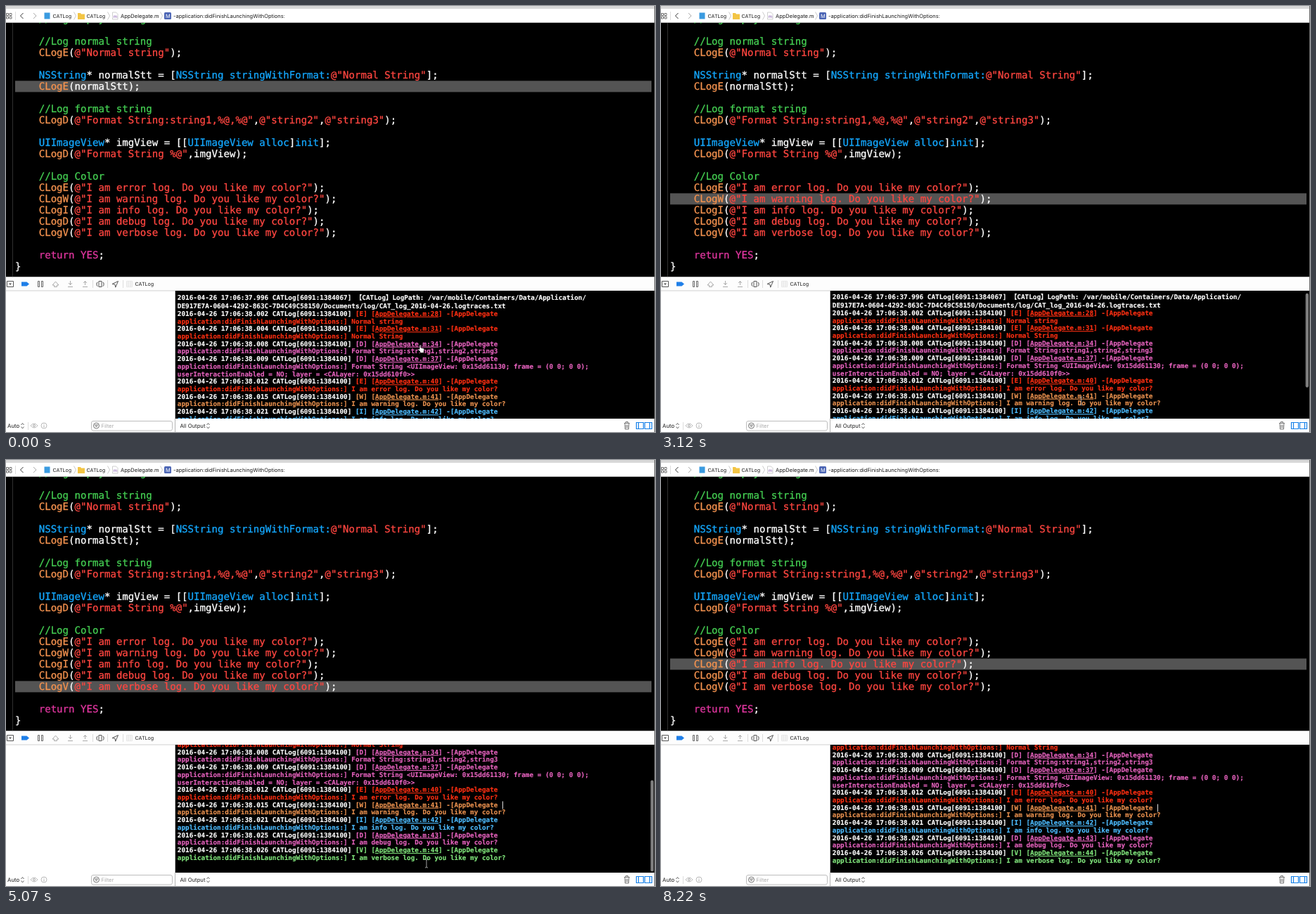
Write an HTML page that moves like this. It is 923 by 606 pixels and loops after 8670 ms.

```html
<!DOCTYPE html>
<html lang="en">
<head>
<meta charset="utf-8">
<title>Colored console log</title>
<style>
  html, body { margin: 0; width: 100%; height: 100%; overflow: hidden; background: #fff; }
  svg { display: block; width: 923px; height: 606px; }
  text { white-space: pre; text-rendering: geometricPrecision; }
  .mono { font-family: "DejaVu Sans Mono", "Noto Sans CJK SC", "Noto Sans CJK", monospace; fill: #fff; stroke: #fff; }
  #code { font-size: 14.08px; stroke-width: .3px; }
  #log { font-size: 9.35px; font-weight: bold; stroke-width: .15px; }
  .ui { font: 7.5px Inter, "Liberation Sans", sans-serif; fill: #1c1c1c; }
  .line { fill: none; stroke: #555; stroke-width: 1; }
  .dim { stroke: #aaa; }
</style>
</head>
<body>
<svg viewBox="0 0 923 606">
  <defs>
    <clipPath id="pane"><rect x="241" y="405" width="682" height="182"/></clipPath>
  </defs>
  <rect width="923" height="606" fill="#fff"/>

  <!-- editor -->
  <rect y="23.500" width="923" height="362"/>
  <path d="M9.5 24V385.500" stroke="#303030"/>
  <rect id="mark" x="13" width="905" height="16" fill="#545454"/>
  <g id="code" class="mono"></g>

  <!-- jump bar -->
  <rect width="923" height="23.500" fill="#fff"/>
  <rect width="923" height="4" fill="#d8d8d8"/>
  <g class="line">
    <path d="M.5 10.5h3v3h-3zM5 10.5h3v3h-3zM.5 15h3v3h-3zM5 15h3v3h-3z" stroke-width=".8"/>
    <path d="M24.500 10l-4 4 4 4" stroke="#333"/>
    <path d="M39 10l4 4-4 4" class="dim"/>
    <path d="M13.500 8v12" stroke="#ddd"/>
    <path d="M96.500 8.500l3 5.500-3 5.500M144.500 8.500l3 5.500-3 5.500M219.500 8.500l3 5.500-3 5.500" stroke="#bbb" stroke-width=".8"/>
  </g>
  <rect x="54.500" y="9.500" width="8" height="9" fill="#3a9be0"/>
  <path d="M102 10h4l1 1.500h5v7.500h-10z" fill="#f3c545"/>
  <path d="M151.500 9h5l2.500 2.500v7.500h-7.500z" fill="#fff" stroke="#bbb" stroke-width=".7"/>
  <rect x="225" y="9" width="10" height="10" rx="1.500" fill="#4a64b4"/>
  <g class="ui">
    <text x="66.500" y="16.700" font-size="7.150">CATLog</text>
    <text x="114.500" y="16.700" font-size="7.150">CATLog</text>
    <text x="152.800" y="17" font-size="6" fill="#7a4aa8">m</text>
    <text x="163" y="16.700">AppDelegate.m</text>
    <text x="227" y="16.700" fill="#fff">M</text>
    <text x="238" y="16.700">-application:didFinishLaunchingWithOptions:</text>
  </g>

  <!-- debug bar -->
  <rect y="385.500" width="923" height="19.500" fill="#fdfdfd"/>
  <path d="M0 405H241" stroke="#d0d0d0"/>
  <g class="line">
    <path d="M1.500 391.500h9v8h-9z"/>
    <path d="M4 394.500h4l-2 2.500z" fill="#555" stroke="none"/>
    <path d="M22 392.500h7.500l3.500 3-3.500 3h-7.500z" fill="#1f7fe8" stroke="none"/>
    <path d="M45.500 391.500h2v8h-2zM50.500 391.500h2v8h-2z" stroke-width=".9"/>
    <path class="dim" d="M66 397l4.500-5 4.500 5h-2.500v2.500h-4v-2.500z"/>
    <path class="dim" d="M91.500 391v5.500m-2.500-2.500l2.500 2.500 2.500-2.500M88 399.500h7"/>
    <path class="dim" d="M112.500 397v-5.500m-2.500 2.500l2.500-2.500 2.500 2.500M109 399.500h7"/>
    <path d="M132 391.500h4v8h-4zM130.500 393l-1.500 1v3.500l1.500 1M137.500 393l1.500 1v3.500l-1.500 1"/>
    <path d="M159.500 391.500l-8.500 4 4 .7.700 4z"/>
    <path d="M123.500 390v11M144.500 390v11M166.500 390v11" stroke="#ddd"/>
    <path d="M171.500 391.500h8v8h-8zM174 391.500v8M177 391.500v8M171.500 394h8M171.500 397h8" stroke="#ddd" stroke-width=".7"/>
  </g>
  <text class="ui" x="183.500" y="398.300" style="font-size:7.150px">CATLog</text>

  <!-- console -->
  <rect x="241" y="405" width="682" height="182"/>
  <path d="M240.500 405V606" stroke="#b5b5b5"/>
  <g clip-path="url(#pane)">
    <g id="scroll">
      <g id="log" class="mono"></g>
      <path id="caret" d="M706.500 550.500v11" stroke="#ddd"/>
    </g>
    <rect id="thumb" x="916.700" width="4.300" rx="2.150" fill="#7d7d7d"/>
  </g>

  <!-- bottom bar -->
  <rect x="241" y="587" width="682" height="19" fill="#fff"/>
  <g class="ui">
    <text x="2" y="600" style="font-size:7.800px">Auto</text>
    <text x="247.500" y="600" style="font-size:7.700px">All Output</text>
    <rect x="121.500" y="590.500" width="115" height="13.500" rx="2.500" fill="#fff" stroke="#bdbdbd"/>
    <text x="135.500" y="600" fill="#aaa">Filter</text>
  </g>
  <g class="line">
    <path d="M21.500 596l2-2.500 2 2.500M21.500 598.500l2 2.500 2-2.500M285.500 596l2-2.500 2 2.500M285.500 598.500l2 2.500 2-2.500" stroke-width=".9"/>
    <path d="M31.500 592v11" stroke="#ddd"/>
    <path class="dim" d="M35 597q5-6 10 0q-5 6-10 0z" stroke-width=".8"/>
    <circle class="dim" cx="40" cy="597" r="1.500"/>
    <circle class="dim" cx="54" cy="597" r="4" stroke-width=".8"/>
    <path class="dim" d="M54 594.500v1M54 596.500v3"/>
    <circle cx="128.500" cy="597" r="4" stroke-width=".8"/>
    <path d="M126 596h5M127 598h3" stroke-width=".9"/>
    <path d="M879 593.500h8M881.500 593v-1.500h3v1.500M880 594l.5 8h5l.5-8M882 595.500v5M884 595.500v5" stroke-width=".8"/>
    <path d="M896.500 592.500h10v9h-10zM908.500 592.500h10v9h-10z" stroke="#1580e8" stroke-width="1.200"/>
    <path d="M899.500 592.500v9M915.500 592.500v9" stroke="#1580e8" stroke-width="1.200"/>
  </g>

  <!-- window edge -->
  <path d="M922.500 0V606" stroke="#6a6a6a"/>

  <!-- pointer -->
  <g id="pointer">
    <path id="hand" d="M-2-5.500q1-1.200 2 0v3.500l4 1q1 .5.800 2l-.8 3v1.500h-5v-1.500l-3-3.500q-.5-1.500 1-1l1 .8z" fill="#fff" stroke="#000" stroke-width=".8"/>
    <path id="beam" d="M-2-6q2 0 2 1.500v9q0 1.500-2 1.500M2-6q-2 0-2 1.500M0 4.500q0 1.500 2 1.500" fill="none" stroke="#b4b4b4" stroke-width=".9"/>
  </g>
</svg>

<script>
const LOOP = 8670, TICK = 150;
const $ = id => document.getElementById(id);

function make(parent, name, attrs, text = "") {
  const node = document.createElementNS("http://www.w3.org/2000/svg", name);
  for (const key in attrs) node.setAttribute(key, attrs[key]);
  node.textContent = text;
  return parent.appendChild(node);
}
// A thin stroke in the text colour gives the heavier glyphs
const ink = color => ({ fill: color, stroke: color });

// Source code, coloured by token
const code = `//Log empty string

//Log normal string
CLogE(@"Normal string");

NSString* normalStt = [NSString stringWithFormat:@"Normal String"];
CLogE(normalStt);

//Log format string
CLogD(@"Format String:string1,%@,%@",@"string2",@"string3");

UIImageView* imgView = [[UIImageView alloc]init];
CLogD(@"Format String %@",imgView);

//Log Color
CLogE(@"I am error log. Do you like my color?");
CLogW(@"I am warning log. Do you like my color?");
CLogI(@"I am info log. Do you like my color?");
CLogD(@"I am debug log. Do you like my color?");
CLogV(@"I am verbose log. Do you like my color?");

return YES;
}`;
const syntax = [
  [/^\/\//, "#45d053"],
  [/^@"/, "#ff4640"],
  [/^CLog/, "#f3924f"],
  [/^(NSString|UIImageView|stringWithFormat:|alloc|init)$/, "#14a8ff"],
  [/^(return|YES)$/, "#e0369f"]
];
const token = /(\/\/.*|@"[^"]*"|CLog\w|\bNSString\b|UIImageView|stringWithFormat:|\balloc\b|\binit\b|return|YES)/;

code.split("\n").forEach((line, i) => {
  const row = make($("code"), "text", { x: line === "}" ? 13 : 46.7, y: 23.3 + 16 * i });
  for (const part of line.split(token)) {
    const rule = syntax.find(([pattern]) => pattern.test(part));
    make(row, "tspan", rule ? ink(rule[1]) : {}, part);
  }
});

// Console output
const levels = { E: "#ff2f12", W: "#e9914f", I: "#4dbcff", D: "#e562bd", V: "#80e57c" };
const entries = [
  ["002", "E", 28, "Normal string"],
  ["004", "E", 31, "Normal String"],
  ["008", "D", 34, "Format String:string1,string2,string3"],
  ["009", "D", 37, "Format String <UIImageView: 0x15dd61130; frame = (0 0; 0 0);\nuserInteractionEnabled = NO; layer = <CALayer: 0x15dd610f0>>"],
  ["012", "E", 40, "I am error log. Do you like my color?"],
  ["015", "W", 41, "I am warning log. Do you like my color?"],
  ["021", "I", 42, "I am info log. Do you like my color?"],
  ["025", "D", 43, "I am debug log. Do you like my color?"],
  ["026", "V", 44, "I am verbose log. Do you like my color?"]
];
let rowCount = 0;
function logRow(text, color = "#fff") {
  const y = rowCount ? 430.1 + 10.72 * (rowCount - 1) : 418.4;
  rowCount++;
  return make($("log"), "text", { x: 243.8, y, ...ink(color) }, text);
}

logRow("2016-04-26 17:06:37.996 CATLog[6091:1384067] 【CATLog】LogPath: /var/mobile/Containers/Data/Application/");
logRow("DE917E7A-0604-4292-863C-7D4C49C58150/Documents/log/CAT_log_2016-04-26.logtraces.txt");
for (const [ms, level, line, message] of entries) {
  const color = levels[level];
  const row = logRow(`2016-04-26 17:06:38.${ms} CATLog[6091:1384100] `);
  make(row, "tspan", ink(color), `[${level}] [`);
  make(row, "tspan", { ...ink(color), "text-decoration": "underline" }, `AppDelegate.m:${line}`);
  make(row, "tspan", ink(color), "] -[AppDelegate");
  `application:didFinishLaunchingWithOptions:] ${message}`.split("\n").forEach(s => logRow(s, color));
}

// Timelines: [time, value...]
const marked = [[0, 31], [300, 34], [1890, 40], [2820, 41], [4620, 44], [6570, 42]];
const caretOn = [[0, 0], [450, 1], [1050, 0], [1440, 1], [2040, 0], [2520, 1], [3120, 0], [3720, 1],
  [4320, 0], [4770, 1], [5370, 0], [5970, 1], [6570, 0], [7170, 1], [7620, 0], [8220, 1]];
const shape = [[0, "hand"], [300, "beam"], [1290, "hand"], [1890, "beam"], [2340, "hand"], [2820, "beam"],
  [3870, "hand"], [4620, "beam"], [5820, "hand"], [6570, "beam"], [7020, "none"]];
const path = [[0, 590, 488], [750, 590, 488], [1290, 590, 530], [1590, 590, 533], [1890, 590, 533],
  [2520, 597, 561], [3720, 598, 563], [4020, 600, 577], [4620, 600, 577], [5070, 598, 574],
  [5370, 598, 574], [5970, 599, 523], [6270, 599, 525], [7020, 599, 525]];
const offset = [[0, 0], [2970, 0], [3120, 1], [3270, 10], [3420, 29], [3570, 43], [3720, 49],
  [4920, 49], [5070, 65], [5220, 65], [5520, 62], [5820, 61]];

const hold = (keys, t) => keys.filter(k => k[0] <= t).pop()[1];
function tween(keys, t, n = 1) {
  const i = keys.findIndex(k => k[0] > t);
  if (i < 0) return keys[keys.length - 1][n];
  const a = keys[i - 1], b = keys[i];
  return a[n] + (b[n] - a[n]) * (t - a[0]) / (b[0] - a[0]);
}

function draw(t) {
  // Movement advances on a coarse tick
  const tick = Math.max(0, Math.floor((t + 30) / TICK) * TICK - 30);
  const show = (id, on) => $(id).setAttribute("visibility", on ? "visible" : "hidden");

  $("mark").setAttribute("y", 106.4 + 16 * (hold(marked, t) - 31));

  const y = tween(offset, tick);
  $("scroll").setAttribute("transform", `translate(0 ${-y})`);
  const top = 408 + 0.73 * y;
  $("thumb").setAttribute("y", top);
  $("thumb").setAttribute("height", Math.min(134, 585.5 - top));
  show("thumb", t >= 3120 && t < 7170);
  show("caret", hold(caretOn, t));

  const kind = hold(shape, t);
  $("pointer").setAttribute("transform", `translate(${tween(path, tick, 1)} ${tween(path, tick, 2)})`);
  show("hand", kind === "hand");
  show("beam", kind === "beam");
}

const start = performance.now();
function frame() {
  draw((performance.now() - start) % LOOP);
  requestAnimationFrame(frame);
}
draw(0);
requestAnimationFrame(frame);
</script>
</body>
</html>
```
